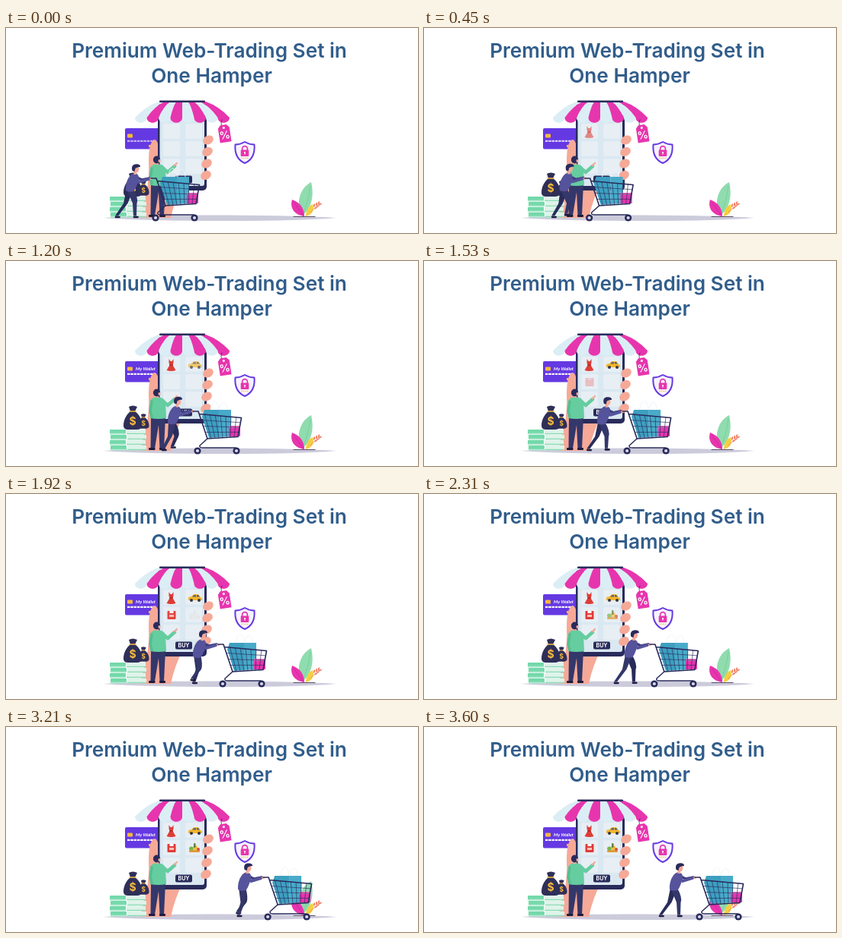
Animation, 540 px wide and 270 px high, one loop 3.9 s. Source, as an HTML page with a canvas:

```html
<!DOCTYPE html>
<html lang="en">
<head>
<meta charset="utf-8">
<style>
html, body { margin: 0; width: 100%; height: 100%; overflow: hidden; background: #fff; }
canvas { display: block; width: 540px; height: 270px; }
</style>
</head>
<body>
<canvas id="stage" width="540" height="270"></canvas>
<script>
const ctx = document.getElementById('stage').getContext('2d');
const LOOP = 3900, WALK = 3600, TICK = 30, DISTANCE = 165, STEP = WALK / 14;
const NAVY = '#292b5b', TROUSERS = '#34376a', SHIRT = '#55539b', PINK = '#e735ae', PURPLE = '#6539e2',
  SKIN = '#f6a997', GREEN = '#65cda0', TEAL = '#3d9fc0', GOLD = '#f6b93b', PALE = '#dceef5';

const clamp = v => Math.max(0, Math.min(1, v));
const ramp = (t, from, to) => clamp((t - from) / (to - from));

function fill(d, color) {
  ctx.fillStyle = color;
  ctx.fill(new Path2D(d));
}
function stroke(d, color, width = 1) {
  ctx.strokeStyle = color;
  ctx.lineWidth = width;
  ctx.stroke(new Path2D(d));
}
function rect(x, y, w, h, color, r = 0) {
  ctx.fillStyle = color;
  ctx.beginPath();
  ctx.roundRect(x, y, w, h, r);
  ctx.fill();
}
function oval(x, y, rx, ry, color, turn = 0) {
  ctx.fillStyle = color;
  ctx.beginPath();
  ctx.ellipse(x, y, rx, ry, turn, 0, Math.PI * 2);
  ctx.fill();
}
function text(s, x, y, font, color) {
  ctx.font = font;
  ctx.fillStyle = color;
  ctx.textAlign = 'center';
  ctx.fillText(s, x, y);
}
function group(draw, { x = 0, y = 0, turn = 0, scale = 1, alpha = 1 }) {
  if (alpha <= 0) return;
  ctx.save();
  ctx.translate(x, y);
  ctx.rotate(turn);
  ctx.scale(scale, scale);
  ctx.globalAlpha = alpha;
  draw();
  ctx.restore();
}

function drawTitle() {
  const font = '600 26.2px Inter, "Open Sans", sans-serif';
  text('Premium Web-Trading Set in', 266.5, 39, font, '#315d8b');
  text('One Hamper', 269.5, 72, font, '#315d8b');
}

function drawGround() {
  fill('M127 250 Q180 246 290 246.5 Q390 247 433 250 Q390 254 290 254 Q180 254 127 250Z', '#cccbdb');
}

function drawLeaves() {
  stroke('M377 248.5 H405', '#5b4a66', 1);
  fill('M388 247 C380 234 383 212 400 203 C404 220 401 238 388 247Z', '#8fdcae');
  stroke('M389 246 Q396 230 399 208', '#6cc795', .6);
  fill('M391 248 C376 246 372 235 375 226 C386 230 391 238 391 248Z', PINK);
  stroke('M390 247 Q383 238 377 229', '#c02192', .6);
  fill('M393 248 C393 240 397 234 402 232 C405 240 401 246 393 248Z', '#f4cf42');
  stroke('M399 243 Q404 238 410 231', '#ef8058', .7);
  for (let i = 0; i < 3; i++) {
    oval(404 + i * 3, 233.5 - i * 1.5, .9, 2.4, '#ef7458', .2);
    oval(406 + i * 3, 237 - i * 2.5, .9, 2.2, '#ef7458', 1.1);
  }
}

function drawCard(t) {
  rect(156, 132, 45, 27.5, PURPLE, 2);
  rect(159, 139.5, 7, 5, GOLD, 1);
  const drawDigits = () => {
    for (let i = 0; i < 9; i++) rect(159 + i * 4.3, 147.8, 3.4, 2.2, '#fff');
  };
  group(drawDigits, { alpha: .6 + .4 * ramp(t, 30, 1000) });
  rect(187, 154, 4, 3, GOLD);
  rect(192, 154, 4, 3, '#f58d54');
  const drawName = () => text('My Wallet', 183, 144, 'italic bold 6px Lato, sans-serif', '#fff');
  group(drawName, { alpha: ramp(t, 570, 1110) });
}

function drawDress() {
  fill('M-3 -8 L-1 -5 L1 -5 L3 -8 L3 -3 L2 0 L6 7 Q0 9 -6 7 L-2 0 L-3 -3Z', '#dd3d36');
  stroke('M-2 0 H2', '#8c2020', 1);
}
function drawCar() {
  fill('M-9 3 V-1 L-5 -2 L-2 -5 H4 L7 -1 L9 0 V3Z', '#f4b62d');
  fill('M-4 -1.5 L-1.5 -4 H1 V-1.5Z M2 -4 H4 L6 -1.5 H2Z', '#5a6478');
  for (const x of [-5, 5]) oval(x, 3, 2, 2, '#333648');
}
function drawBox() {
  rect(-5.5, -5, 11, 11, '#df3b38', 1);
  rect(-2.5, -5, 5, 3, '#fff');
  rect(-3, 0, 6, 3, '#f7c3b8');
}
function drawFood() {
  rect(-7, 3, 14, 3, '#df9a3d', 1);
  oval(-4, 1, 3, 2.5, '#76b84b');
  oval(1, 0, 3, 3, '#f0bd42');
  oval(5, 2, 2, 2, '#d85138');
  rect(-1, -6, 2.5, 6, '#607f48', 1);
}

function drawHand() {
  fill('M176 250 Q180 231 184 215 Q188 199 187 175 Q187 151 194 147 Q199 147 200 158 V205 H232 Q221 226 216 250Z', SKIN);
}

function drawPhone(t) {
  rect(199, 96, 64, 118, NAVY, 5);
  rect(201.5, 98, 58.5, 110, '#dae8f1', 3);
  for (let i = 0; i < 6; i++)
    rect(206 + (i % 2) * 29, 126 + Math.floor(i / 2) * 23, 22, 20, '#e7eef4', 2);
  rect(222, 194.5, 22, 10, NAVY, 2);
  text('BUY', 233, 202.2, 'bold 7px Inter, sans-serif', '#fff');
  group(drawDress, { x: 216.5, y: 137, alpha: ramp(t, 120, 690) });
  group(drawCar, { x: 248, y: 137, alpha: ramp(t, 810, 1380) });
  group(drawBox, { x: 217, y: 159, alpha: ramp(t, 1380, 1950) });
  group(drawFood, { x: 247, y: 159, alpha: ramp(t, 1890, 2460) });
  for (let i = 0; i < 4; i++)
    oval(265 - i, 147.5 + i * 15.5, 7.2, 5.6, SKIN, -.5);
}

function drawAwning() {
  const stripes = 8, top = i => 200 + i * 62 / stripes, low = i => 169 + i * 124 / stripes;
  const bulge = i => top(i) * .45 + low(i) * .55;
  for (let i = 0; i < stripes; i++) {
    const a = low(i), b = low(i + 1);
    fill(`M${top(i)} 97 H${top(i + 1)} Q${bulge(i + 1)} 103 ${b} 118
      C${b} 127 ${a} 127 ${a} 118 Q${bulge(i)} 103 ${top(i)} 97Z`, i % 2 ? PINK : PALE);
  }
  rect(201, 95.5, 60, 2.5, NAVY, 1);
}

function drawTag() {
  stroke('M283 121 Q280 126 285 133', NAVY, .8);
  group(() => {
    fill('M-4 -12 H4 L7.5 -8 V11 H-7.5 V-8Z', PINK);
    oval(0, -8, 1.5, 1.5, '#fff');
    text('%', 0, 6.5, '600 14px Inter, sans-serif', '#fff');
  }, { x: 286.5, y: 139.5, turn: -.15 });
}

function drawShield() {
  const d = 'M313 150 Q319 153.5 325.5 153.5 Q327 172 313 178 Q299 172 300.5 153.5 Q307 153.5 313 150Z';
  fill(d, '#f6f3ff');
  stroke(d, PURPLE, 2);
  stroke('M309.6 161 V159 A3.4 3.4 0 0 1 316.4 159 V161', PINK, 1.7);
  rect(307.7, 160.5, 10.6, 8.5, PINK, 1);
  oval(313, 164, 1.1, 1.1, '#fff');
  rect(312.5, 164, 1, 2.8, '#fff');
  for (let i = 0; i < 4; i++) oval(309.2 + i * 2.5, 171.3, .8, .8, GOLD);
}

function drawStack(x, y, w, color, edge) {
  for (let i = 0; i < 4; i++) {
    rect(x + (i % 2), y + i * 7, w, 6.3, color, .7);
    rect(x + (i % 2), y + i * 7 + 4.8, w, 1.5, edge, .5);
  }
}
function drawBag() {
  fill('M-5 -15 Q0 -18 6 -15 L3 -9 C9 -5 13 3 12 11 Q11 15 6 15 H-6 Q-12 15 -12 10 C-12 2 -8 -5 -3 -9Z', '#2f2f58');
  stroke('M-4 -9 H4', GOLD, 1.6);
  text('$', 0, 9, 'bold 14px Inter, sans-serif', GOLD);
}
function drawMoney() {
  drawStack(158, 222, 25, '#dff3ea', '#8fdbb8');
  drawStack(136, 222, 21, '#74d9ab', '#b5ead2');
  group(drawBag, { x: 180, y: 211.5, scale: .62 });
  group(drawBag, { x: 166, y: 207 });
}

function drawShopper() {
  fill('M190 205 H209 L207 247 H201.5 L200 216 L195 247 H189.5Z', TROUSERS);
  rect(187, 246, 8.5, 3, '#1d1d40', 1);
  rect(201, 246, 8, 3, '#1d1d40', 1);
  fill('M189 184 Q192 179 198 179 Q206 179 209 185 L210 207 Q200 209 189 207Z', GREEN);
  stroke('M205 184 L212 190 L221 182', GREEN, 4.6);
  stroke('M221 181 L224 178', SKIN, 2.4);
  stroke('M191 185 L189 198 L191 205', '#55bd90', 3.5);
  rect(196, 175, 4, 5, SKIN);
  oval(197.5, 173.5, 4.6, 5, NAVY);
  oval(201, 175, 1.5, 2, SKIN);
}

function drawLeg(phase, color) {
  const swing = Math.max(0, -Math.sin(phase));
  const x = 157 + 12 * Math.cos(phase), y = 247.5 - 4 * swing;
  const knee = (x + 163) / 2 + 3 + 3 * swing;
  fill(`M158 212 H167 Q${knee + 5} 225 ${knee + 2.5} 231 L${x + 2} ${y} H${x - 2} L${knee - 3} 231 Z`, color);
  stroke(`M${x - 1} ${y + 1.5} h4.5`, '#1d1d40', 2.6);
}

function drawWalker(t) {
  const phase = Math.PI * t / STEP;
  drawLeg(phase + Math.PI, '#292c5a');
  drawLeg(phase, TROUSERS);
  group(() => {
    stroke('M170 196 L178 200 L188 198', '#3f3d80', 3.6);
    fill('M157 214 C156 204 161 193 167 191.5 Q173 191 174 196 Q173 207 167.5 215 Q161 217 157 214Z', SHIRT);
    stroke('M168 196 L174 203 L187 199', SHIRT, 3.8);
    oval(190, 198.5, 1.9, 1.7, SKIN);
    rect(167.5, 188, 3.5, 5, SKIN);
    oval(170.5, 186, 3.8, 4.6, SKIN);
    fill('M165.5 188 Q163.5 180.5 169 179.5 Q176 178.5 176 183 Q171 183.5 169.5 185 L168.5 189Z', NAVY);
  }, { y: .6 * Math.sin(2 * phase) });
}

function drawCart(t) {
  stroke('M213 196 C214 181 223 181 224 196 M225 196 C226 183 235 183 235 196', '#f0f5f9', 1);
  fill('M205 196 H224 V232 L211 233 L202 205Z', TEAL);
  fill('M224 196 H240 V231 L224 232Z', '#48abc9');
  rect(237, 217, 15, 14, PINK, 1);
  rect(237, 217, 15, 3, '#f66cc5');
  stroke('M190 198 H197 L209 234 L249 231.5 L253.5 206.5 L198.5 201.5', NAVY, 1.6);
  for (let i = 1; i < 8; i++)
    stroke(`M${198.5 + i * 6.9} ${201.5 + i * .6} L${209 + i * 5} ${234 - i * .3}`, NAVY, .65);
  for (let i = 1; i < 4; i++)
    stroke(`M${198.5 + i * 2.6} ${201.5 + i * 8} L${253.5 - i} ${206.5 + i * 6.3}`, NAVY, .65);
  stroke('M209 234 L199 243 Q198 246 203 246 H246', NAVY, 1.5);
  for (const x of [196, 247]) {
    oval(x, 250, 4.6, 4.6, NAVY);
    oval(x, 250, 2.1, 2.1, '#d9d9e8');
  }
}

function drawScene(t) {
  ctx.fillStyle = '#fff';
  ctx.fillRect(0, 0, 540, 270);
  ctx.lineCap = ctx.lineJoin = 'round';
  drawTitle();
  drawGround();
  drawLeaves();
  drawCard(t);
  drawHand();
  drawPhone(t);
  drawAwning();
  drawTag();
  drawShield();
  drawMoney();
  drawShopper();
  group(() => {
    drawWalker(t);
    drawCart(t);
  }, { x: DISTANCE * t / WALK });
}

const start = performance.now();
function frame(now) {
  const elapsed = Math.max(0, now - start) % LOOP;
  drawScene(Math.min(WALK, Math.floor(elapsed / TICK) * TICK));
  requestAnimationFrame(frame);
}
drawScene(0);
requestAnimationFrame(frame);
</script>
</body>
</html>
```
